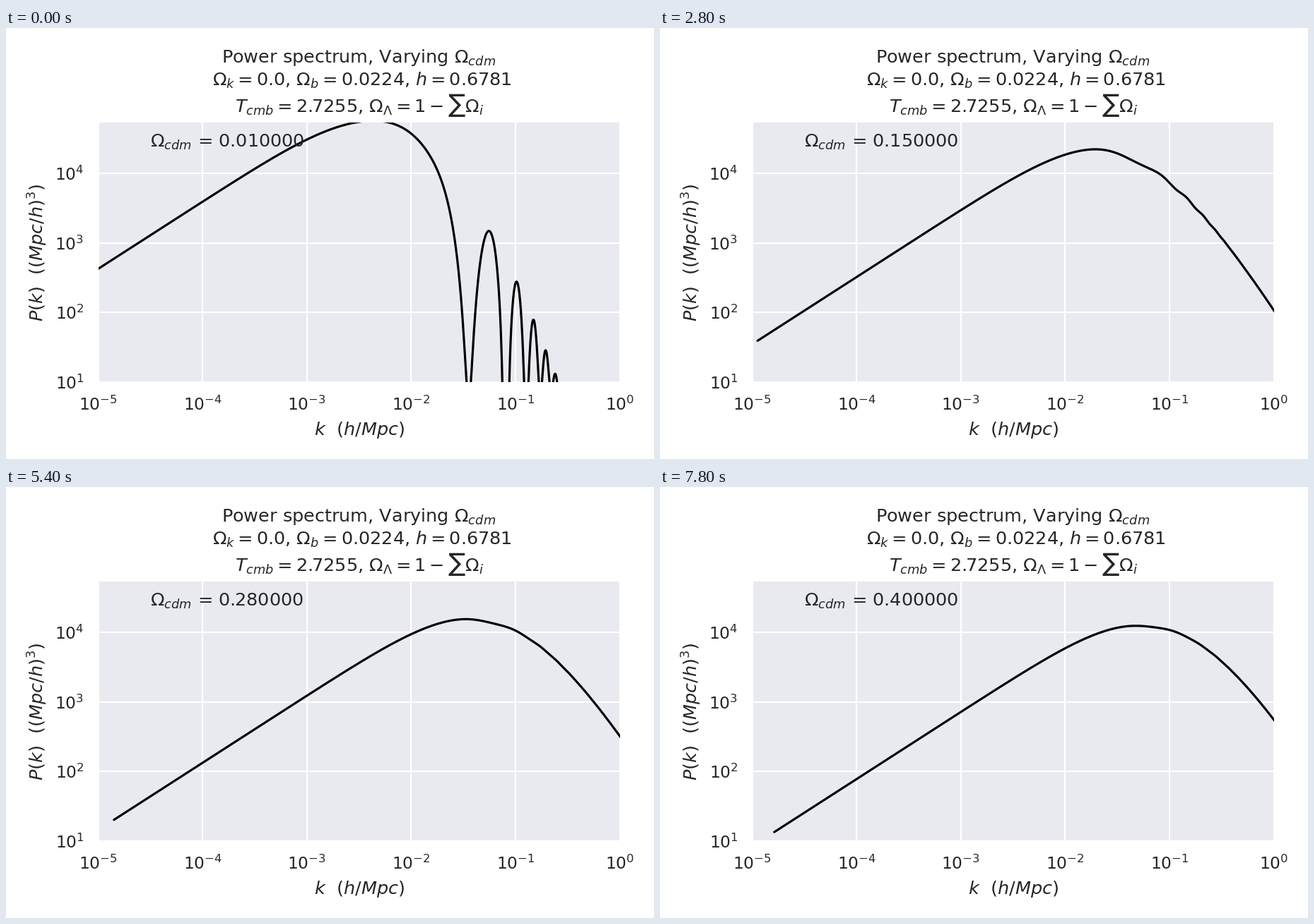
A matplotlib script that plays this animation: 917 px wide and 611 px high, repeating every 8000 ms.

```python
import numpy as np
import matplotlib.pyplot as plt
from matplotlib.animation import FuncAnimation

W, H, DPI = 917, 611, 128
PT = W / 6 / DPI          # the layout is designed for a 6 in wide page
INK = "0.15"

# Cosmology
h, w_b, T_cmb = 0.6781, 0.0224, 2.7255
A_s, n_s, k_pivot = 2.12e-9, 0.96605, 0.05
c_H0 = 2997.92            # Hubble distance, Mpc/h
theta = T_cmb / 2.7
mid = (np.arange(4000) + 0.5) / 4000


def transfer(k, w_c):
    """Fitting formula for the matter transfer function, k in 1/Mpc."""
    w_m = w_b + w_c
    fb, fc = w_b / w_m, w_c / w_m

    # Equality, drag epoch and sound horizon
    z_eq = 2.5e4 * w_m / theta**4
    k_eq = 0.0746 * w_m / theta**2
    b1 = 0.313 * w_m**-0.419 * (1 + 0.607 * w_m**0.674)
    b2 = 0.238 * w_m**0.223
    z_d = 1291 * w_m**0.251 / (1 + 0.659 * w_m**0.828) * (1 + b1 * w_b**b2)
    R_d = 31.5e3 * w_b / theta**4 / z_d
    R_eq = 31.5e3 * w_b / theta**4 / z_eq
    s = (2 / (3 * k_eq) * np.sqrt(6 / R_eq)
         * np.log((np.sqrt(1 + R_d) + np.sqrt(R_d + R_eq)) / (1 + np.sqrt(R_eq))))
    k_silk = 1.6 * w_b**0.52 * w_m**0.73 * (1 + (10.4 * w_m)**-0.95)
    q, ks = k / (13.41 * k_eq), k * s

    def T0(alpha, beta):
        log = np.log(np.e + 1.8 * beta * q)
        C = 14.2 / alpha + 386 / (1 + 69.9 * q**1.08)
        return log / (log + C * q**2)

    # Cold dark matter; fb**2 terms refine the fit for many baryons
    a1 = (46.9 * w_m)**0.67 * (1 + (32.1 * w_m)**-0.532)
    a2 = (12 * w_m)**0.424 * (1 + (45 * w_m)**-0.582)
    alpha_c = a1**-fb * a2**-(fb**3) * (1 - 0.17 * fb**2)
    c1 = 0.944 / (1 + (458 * w_m)**-0.708)
    c2 = (0.395 * w_m)**-0.0266
    beta_c = 1 / (1 + c1 * (fc**c2 - 1))
    f = 1 / (1 + (ks / 5.4)**4)
    T_c = f * T0(1, beta_c) + (1 - f) * T0(alpha_c, beta_c)

    # Baryons
    y = (1 + z_eq) / (1 + z_d)
    r = np.sqrt(1 + y)
    G = y * (-6 * r + (2 + 3 * y) * np.log((r + 1) / (r - 1)))
    alpha_b = 2.07 * k_eq * s * (1 + R_d)**-0.75 * G * (1 + 0.25 * fb**2)
    beta_b = 0.5 + fb + (3 - 2 * fb) * np.sqrt((17.2 * w_m)**2 + 1)
    node = 8.41 * w_m**0.435 * (1 - 0.5 * fb**2)
    phase = ks / (1 + (node / ks)**3)**(1 / 3)
    T_b = (T0(1, 1) / (1 + (ks / 5.2)**2)
           + alpha_b / (1 + (beta_b / ks)**3) * np.exp(-(k / k_silk)**1.4))
    T_b = T_b * np.sinc(phase / np.pi)

    # The fit runs slightly high just past the turnover
    excess = 0.02 * np.exp(-np.log(q / 0.4)**2 / 1.5)
    return (fb * T_b + fc * T_c) * (1 - excess)


def spectrum(w_c):
    """Return k in h/Mpc and P(k) in (Mpc/h)^3."""
    O_m = (w_b + w_c) / h**2
    O_r = 4.18e-5 / h**2
    O_L = 1 - O_m - O_r
    horizon = c_H0 * np.mean(1 / np.sqrt(O_m * mid + O_r + O_L * mid**4))
    growth = 2.5 * O_m * np.mean((O_m / mid + O_L * mid**2)**-1.5)
    k = np.geomspace(0.1 / horizon, 1.05, 1600)
    primordial = 2 * np.pi**2 / k**3 * A_s * (k * h / k_pivot)**(n_s - 1)
    poisson = 0.4 * (k * c_H0)**2 / O_m * growth
    return k, primordial * (poisson * transfer(k * h, w_c))**2


plt.rcParams.update({
    "font.family": "DejaVu Sans",
    "font.size": 12 * PT,
    "mathtext.fontset": "dejavusans",
    "text.color": INK,
    "axes.labelcolor": INK,
    "axes.labelsize": 12 * PT,
    "axes.labelpad": 4 * PT,
})

fig = plt.figure(figsize=(W / DPI, H / DPI), dpi=DPI, facecolor="white")
left, right, top, bottom = 130.6, 868.6, 133.8, 501.8
ax = fig.add_axes([left / W, 1 - bottom / H, (right - left) / W, (bottom - top) / H],
                  facecolor="#E9EAF0", axisbelow=True)
ax.set(xscale="log", yscale="log", xlim=(1e-5, 1), ylim=(10, 5.41e4))
ax.minorticks_off()
ax.grid(color="white", lw=PT)
ax.spines[:].set_visible(False)
ax.tick_params(length=6 * PT, pad=3.5 * PT, labelsize=11 * PT, labelcolor=INK,
               left=False, bottom=False)
ax.set_xlabel(r"$k\ \ (h/Mpc)$")
ax.set_ylabel(r"$P(k)\ \ ((Mpc/h)^3)$")

# Title lines with their baselines in pixels from the top
for base, line in [
    (49.5, r"Power spectrum, Varying $\Omega_{cdm}$ "),
    (82.2, r" $\Omega_k=0.0$, $\Omega_b=0.0224$, $h=0.6781$"),
    (119, r"$T_{cmb}=2.7255$, $\Omega_\Lambda=1-\sum\Omega_i$"),
]:
    fig.text((left + right) / 2 / W, 1 - base / H, line, ha="center", va="baseline")

curve, = ax.plot([], [], color="black", lw=1.5 * PT, solid_capstyle="round")
label = ax.text(0.1, 0.904, "", transform=ax.transAxes)


def update(i):
    w_c = 0.01 * (i + 1)
    curve.set_data(*spectrum(w_c))
    label.set_text(rf"$\Omega_{{cdm}}$ = {w_c:f}")
    return curve, label


anim = FuncAnimation(fig, update, frames=40, interval=200, repeat=True, repeat_delay=0)
plt.show()
```
